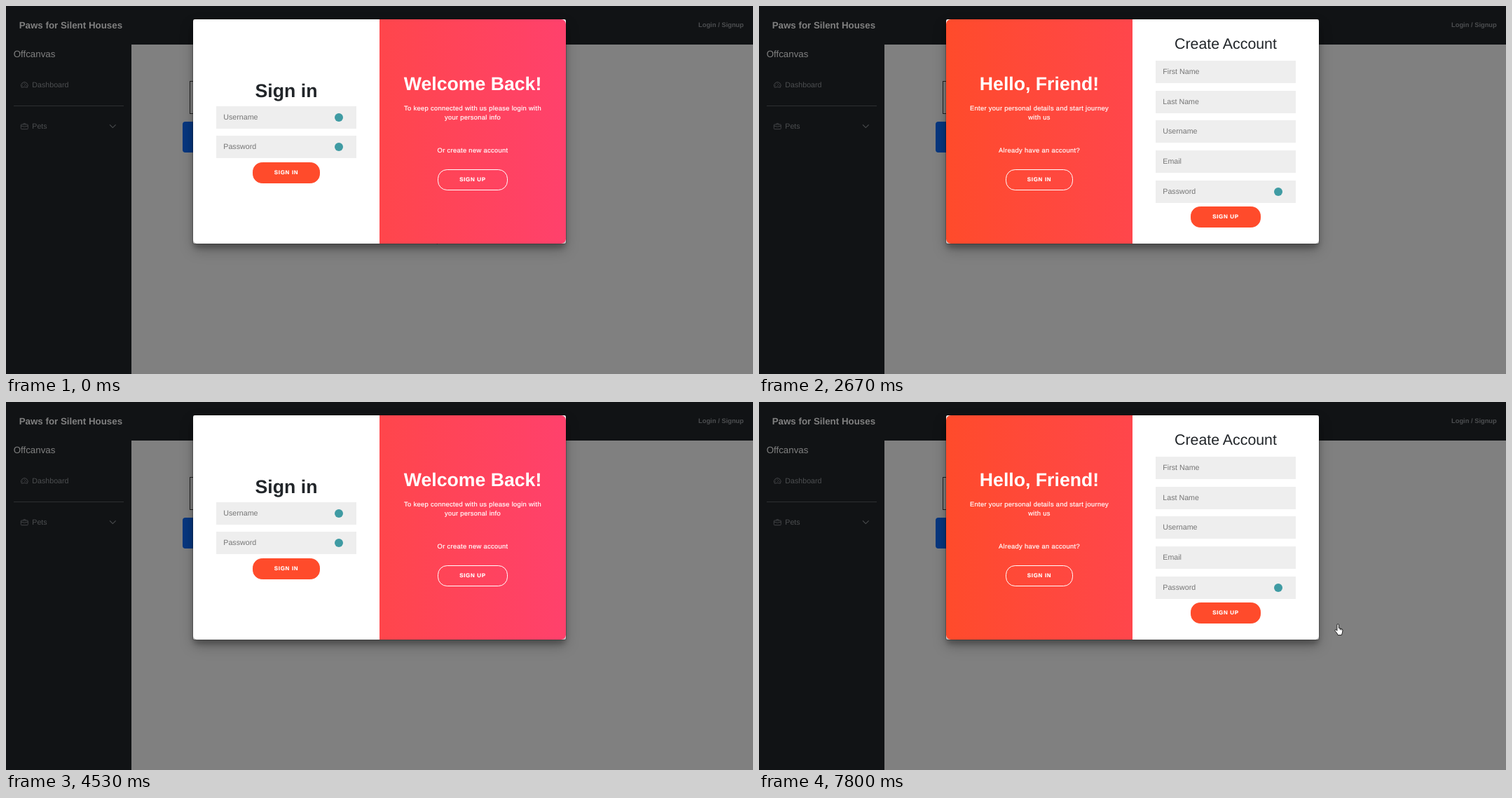
Recreate the animation shown at these times as an HTML page. Size 1066 px wide and 525 px high, loop 8000 ms.

```html
<!DOCTYPE html>
<html lang="en">
<head>
<meta charset="utf-8">
<title>Sign in</title>
<style>
* { box-sizing: border-box; }
html, body { margin: 0; width: 100%; height: 100%; overflow: hidden; background: #808080; }
.page {
  position: absolute; left: 0; top: 0; width: 1599px; height: 788px; zoom: .666667; overflow: hidden;
  font: 16px/24px "Liberation Sans", Arial, sans-serif; text-rendering: geometricPrecision;
  color: #212529; background: #808080;
}
.page > * { position: absolute; }
.header { left: 0; top: 0; width: 100%; height: 82.5px; background: #111315; }
.sidebar { left: 0; top: 0; width: 269px; height: 100%; background: #111315; }
.label { white-space: nowrap; color: #4d4f51; }
.title { font-size: 20px; color: #808080; }
.rule { left: 16px; top: 213px; width: 236px; height: 1px; background: #2e3032; }
.icon { width: 16px; height: 16px; fill: none; stroke: #4d4f51; stroke-width: 1.2; overflow: visible; }
.box { left: 393px; top: 160px; width: 300px; height: 71px; border: 1px solid #222; }
.action { left: 378px; top: 247px; width: 300px; height: 66px; border-radius: 6px; background: #07377f; }

.modal {
  left: 399px; top: 27px; width: 801px; height: 483px; border: 1px solid rgba(0,0,0,.2);
  border-radius: 4.8px; background: #fff; background-clip: padding-box;
}
.container {
  position: relative; width: 798px; height: 480px; overflow: hidden; border-radius: 10px; background: #fff;
  box-shadow: 0 14px 28px rgba(0,0,0,.25), 0 10px 10px rgba(0,0,0,.22);
}
.form, .window, .panel { position: absolute; top: 0; width: 399px; height: 480px; }
.form, .panel {
  display: flex; flex-direction: column; align-items: center; justify-content: center; text-align: center;
}
.form { left: 0; padding: 0 50px; background: #fff; }
h1 { margin: 0; font-size: 40px; line-height: 48px; white-space: nowrap; }
h2 { margin: 0 0 8px; font-size: 32px; line-height: 38.4px; font-weight: 400; }
p { margin: 20px 0 30px; font-size: 14px; line-height: 20px; letter-spacing: .5px; white-space: nowrap; }
p, .button { -webkit-text-stroke: .3px #fff; }
.field {
  position: relative; flex: none; width: 100%; height: 48px; margin: 8px 0; padding: 12px 15px;
  background: #eee; color: #757575; text-align: left;
}
.field.marked::after {
  content: ""; position: absolute; right: 28px; top: 15px; width: 18px; height: 18px;
  border-radius: 50%; background: #3f9ba3;
}
.button {
  flex: none; padding: 12px 45px; border: 1px solid #ff4b2b; border-radius: 20px; background: #ff4b2b;
  color: #fff; font-size: 12px; line-height: 18px; font-weight: 700; letter-spacing: 1px; white-space: nowrap;
}
.window { left: 399px; overflow: hidden; z-index: 100; color: #fff; }
.overlay {
  position: absolute; left: -399px; width: 798px; height: 480px;
  background: linear-gradient(to right, #ff4b2b, #ff416c);
}
.panel.right { left: 399px; }
.panel .button { background: transparent; border-color: #fff; }
.cursor { position: absolute; left: 0; top: 0; width: 14px; height: 18px; overflow: visible; }
.cursor path { fill: #fff; stroke: #111; stroke-width: .8; stroke-linejoin: round; }
#hand { width: 15.4px; height: 19.8px; }
</style>
</head>
<body>
<div class="page">
  <div class="header"></div>
  <div class="sidebar"></div>
  <b class="label title" style="left:28px;top:30px">Paws for Silent Houses</b>
  <b class="label" style="left:1482px;top:29px;font-size:14px">Login / Signup</b>
  <div class="label title" style="left:16px;top:91px">Offcanvas</div>
  <svg class="icon" style="left:32px;top:161px" viewBox="0 0 16 16">
    <path d="M2 13.8A7.3 7.3 0 1 1 14 13.8Q8 11.6 2 13.8ZM7.6 10.2l3.8-3.6M8 4v2M3.6 6l1.2 1.2M2.4 10h2M11.6 10h2"/>
  </svg>
  <div class="label" style="left:56px;top:157px">Dashboard</div>
  <div class="rule"></div>
  <svg class="icon" style="left:32px;top:249px" viewBox="0 0 16 16">
    <path d="M2 4.5h12q1.5 0 1.5 1.5v7q0 1.5-1.5 1.5H2Q.5 14.5.5 13V6Q.5 4.5 2 4.5ZM5.5 4.5v-1q0-1 1-1h3q1 0 1 1v1M.5 7.5L8 9.5l7.5-2"/>
  </svg>
  <div class="label" style="left:56px;top:246px">Pets</div>
  <svg class="icon" style="left:221px;top:249px;stroke-width:1.6" viewBox="0 0 16 16"><path d="M1.6 5L8 11.4 14.4 5"/></svg>
  <div class="box"></div>
  <div class="action"></div>

  <div class="modal"><div class="container">
    <div class="form" id="signUp">
      <h2>Create Account</h2>
      <div class="field">First Name</div>
      <div class="field">Last Name</div>
      <div class="field">Username</div>
      <div class="field">Email</div>
      <div class="field marked">Password</div>
      <div class="button">SIGN UP</div>
    </div>
    <div class="form" id="signIn">
      <h1>Sign in</h1>
      <div class="field marked">Username</div>
      <div class="field marked">Password</div>
      <div class="button">SIGN IN</div>
    </div>
    <div class="window" id="pane">
      <div class="overlay" id="overlay">
        <div class="panel left" id="hello">
          <h1>Hello, Friend!</h1>
          <p>Enter your personal details and start journey<br>with us</p>
          <p>Already have an account?</p>
          <div class="button" id="toSignIn">SIGN IN</div>
        </div>
        <div class="panel right" id="welcome">
          <h1>Welcome Back!</h1>
          <p>To keep connected with us please login with<br>your personal info</p>
          <p>Or create new account</p>
          <div class="button" id="toSignUp">SIGN UP</div>
        </div>
      </div>
    </div>
  </div></div>
</div>
<svg class="cursor" id="arrow"><path d="M.5 .5V11.8L3.1 9.4 4.8 13.3 6.5 12.5 4.8 8.7H8.4Z"/></svg>
<svg class="cursor" id="hand" viewBox="0 0 14 18"><path d="M3.6 9V1.8a1.1 1.1 0 0 1 2.2 0V6l3.4.8q1.7.4 1.7 2.2l-.5 3-1 3H4.6L3.8 13 1 9.6q-.6-1.2.6-1.6 1 0 2 1.4ZM7.6 6.4v2M9.2 6.8v2"/></svg>

<script>
const LOOP = 8000, TICK = 1000 / 15, SLIDE = 600, PRESS = 80, HALF = 399;

const SLIDES = [
  { down: 1975, start: 2008, opens: true },
  { down: 3770, start: 3892, opens: false },
  { down: 6375, start: 6549, opens: true },
];

// time, x, y for each visible stretch of the pointer
const TRACKS = [
  { shape: 'arrow', end: 1500, points: [[0, 610, 326], [133, 703, 402], [400, 703, 402], [850, 775, 432], [1267, 849, 396], [1600, 1050, 315]] },
  { shape: 'hand', end: 1660, points: [[1267, 849, 396], [1600, 1050, 315]] },
  { shape: 'hand', begin: 2995, end: 4525, points: [[3000, 1034, 320], [3333, 834, 320], [4133, 834, 320], [4467, 1009, 376]] },
  { shape: 'hand', begin: 7330, end: LOOP, points: [[7333, 986, 350], [7800, 821, 316]] },
];

const el = id => document.getElementById(id);
const clamp = v => Math.min(1, Math.max(0, v));
const shift = (id, x) => { el(id).style.transform = `translateX(${x}px)`; };

// cubic-bezier(x1, 0, x2, 1)
function bezier(x1, x2, x) {
  let lo = 0, hi = 1;
  for (let i = 0; i < 24; i++) {
    const s = (lo + hi) / 2, r = 1 - s;
    if (3 * x1 * s * r * r + 3 * x2 * s * s * r + s ** 3 < x) lo = s; else hi = s;
  }
  return x <= 0 ? 0 : x >= 1 ? 1 : 3 * lo * lo - 2 * lo ** 3;
}
const easeInOut = x => bezier(.42, .58, clamp(x));
const easeIn = x => bezier(.42, 1, clamp(x));

function drawSlider(t) {
  let open = 0, opacity = 0, onTop = false;
  const scale = { toSignUp: 1, toSignIn: 1 };
  for (const { down, start, opens } of SLIDES) {
    const release = start - 20;
    const press = easeIn((t - down) / PRESS) - easeIn((t - release) / PRESS);
    scale[opens ? 'toSignUp' : 'toSignIn'] -= .05 * press;
    if (t < start) continue;
    const x = (t - start) / SLIDE, p = easeInOut(x);
    open = opens ? p : 1 - p;
    opacity = opens ? +(x >= .5) : 1 - p;
    onTop = opens ? x >= .5 : p < .625;
  }
  for (const id in scale) el(id).style.transform = scale[id] < 1 ? `scale(${scale[id]})` : 'none';
  shift('signIn', HALF * open);
  shift('signUp', HALF * open);
  shift('pane', -HALF * open);
  shift('overlay', HALF * open);
  shift('hello', -.2 * HALF * (1 - open));
  shift('welcome', .2 * HALF * open);
  el('signIn').style.zIndex = 2;
  el('signUp').style.zIndex = onTop ? 5 : 1;
  el('signUp').style.opacity = opacity;
}

function along(points, t) {
  const last = points.at(-1);
  if (t >= last[0]) return last.slice(1);
  const i = Math.max(1, points.findIndex(p => p[0] >= t));
  const [t0, x0, y0] = points[i - 1], [t1, x1, y1] = points[i];
  const u = clamp((t - t0) / (t1 - t0));
  return [x0 + (x1 - x0) * u, y0 + (y1 - y0) * u];
}

function drawCursor(t) {
  const track = TRACKS.find(k => t >= (k.begin || 0) && t < k.end);
  for (const id of ['arrow', 'hand']) el(id).style.display = track && track.shape === id ? 'block' : 'none';
  if (!track) return;
  const [x, y] = along(track.points, t);
  el(track.shape).style.transform = `translate(${Math.round(x)}px, ${Math.round(y)}px)`;
}

// The picture advances 15 times a second and stalls once while sliding back.
function render(time) {
  let tick = Math.floor(((time % LOOP) + 4) / TICK) % 120;
  if (tick === 66) tick = 65;
  drawSlider(tick * TICK);
  drawCursor(tick * TICK);
}

const begin = performance.now();
function loop() {
  render(performance.now() - begin);
  requestAnimationFrame(loop);
}
loop();
</script>
</body>
</html>
```
